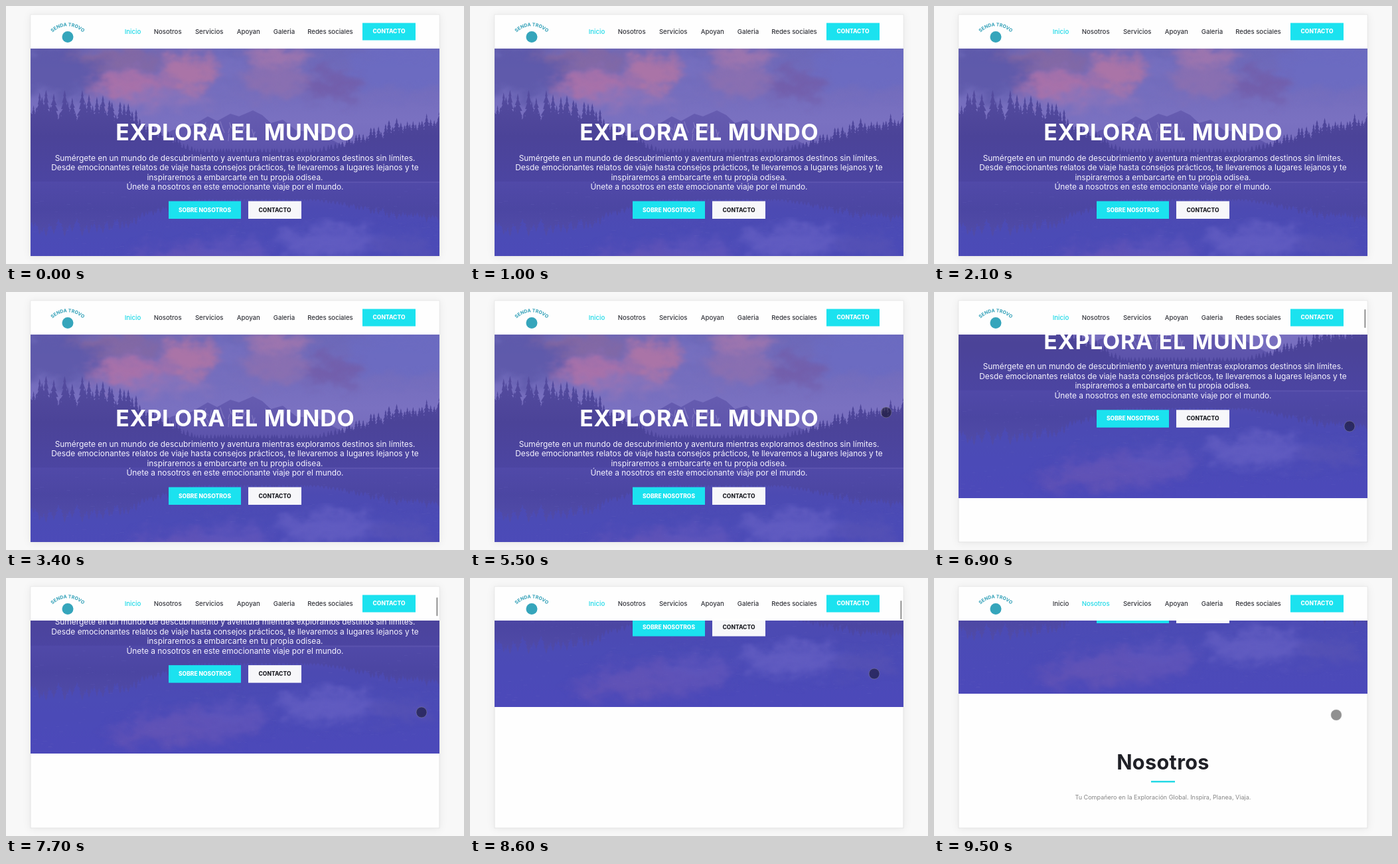
Write an HTML page that moves like this. It is 690 px wide and 388 px high and loops after 9.6 s.

```html
<!DOCTYPE html>
<html lang="es">
<head>
<meta charset="utf-8">
<style>
  html, body { margin: 0; width: 100%; height: 100%; overflow: hidden; background: #f8f8f8; }
  svg { display: block; width: 690px; height: 388px; font-family: Inter, sans-serif; text-anchor: middle; }
  filter { color-interpolation-filters: sRGB; }
  .card { fill: #fefefe; stroke: #dedede; stroke-width: .8; filter: drop-shadow(0 1px 6px rgba(0,0,0,.07)); }
  .title { font-size: 34px; font-weight: 700; letter-spacing: .02em; fill: #fff; }
  .lead { font-size: 11.9px; fill: #f6f4ff; }
  .button { font-size: 8.5px; font-weight: 800; }
  .nav { font-size: 9.6px; font-weight: 500; }
  .heading { font-size: 30.7px; font-weight: 700; letter-spacing: .01em; fill: #202127; }
  .tagline { font-size: 9.05px; fill: #858585; }
  .brand { font-size: 7px; font-weight: 700; fill: #2f9fb7; }
</style>
</head>
<body>
<svg viewBox="0 0 690 388">
  <defs>
    <clipPath id="view"><rect x="37" y="64" width="616" height="312"/></clipPath>
    <clipPath id="photo"><rect x="37" y="64" width="616" height="362"/></clipPath>
    <linearGradient id="sky" x2="0" y2="1">
      <stop offset="0" stop-color="#6c68b8"/>
      <stop offset=".5" stop-color="#7a71c1"/>
      <stop offset="1" stop-color="#6c62b6"/>
    </linearGradient>
    <linearGradient id="forest" x2="0" y2="1">
      <stop offset="0" stop-color="#554c9f"/>
      <stop offset=".5" stop-color="#4b4398"/>
      <stop offset="1" stop-color="#4c45a2"/>
    </linearGradient>
    <linearGradient id="lake" x2="0" y2="1">
      <stop offset="0" stop-color="#5750b2"/>
      <stop offset=".25" stop-color="#4c4ab2"/>
      <stop offset=".5" stop-color="#4b4bb6"/>
      <stop offset="1" stop-color="#4c49ba"/>
    </linearGradient>
    <linearGradient id="rock" x2="0" y2="1">
      <stop offset="0" stop-color="#665cb0"/>
      <stop offset="1" stop-color="#544ca8"/>
    </linearGradient>
    <filter id="ragged" x="-20%" y="-20%" width="140%" height="140%">
      <feGaussianBlur in="SourceGraphic" stdDeviation="9" result="haze"/>
      <feTurbulence type="fractalNoise" baseFrequency=".03 .05" numOctaves="5" seed="8" result="noise"/>
      <feDisplacementMap in="haze" in2="noise" scale="45" xChannelSelector="R" yChannelSelector="G"/>
      <feGaussianBlur stdDeviation=".8"/>
    </filter>
    <filter id="soft"><feGaussianBlur stdDeviation=".6"/></filter>
    <path id="arch" d="M68 42A32.6 32.6 0 0 1 118 42"/>
  </defs>

  <rect width="690" height="388" fill="#f8f8f8"/>
  <rect class="card" x="37" y="13" width="616" height="363"/>

  <g clip-path="url(#view)">
    <g id="page">
      <g clip-path="url(#photo)">
        <rect x="37" y="64" width="616" height="220" fill="url(#sky)"/>
        <g id="clouds" filter="url(#ragged)"></g>
        <g filter="url(#soft)">
          <path fill="url(#rock)" d="M190 225L250 187 280 180 304 166 318 173 338 162 351 166 372 157 386 164 399 176 417 171 437 187 470 190 530 222V270H190Z"/>
          <path id="snow" fill="none" stroke="#9288ca" stroke-width="1.4" opacity=".55"/>
          <path id="trees" fill="url(#forest)"/>
          <rect x="37" y="264" width="616" height="162" fill="url(#lake)"/>
          <use href="#trees" transform="translate(0 422.4) scale(1 -.6)" opacity=".6"/>
          <path d="M230 265H653" stroke="#7a70c0" stroke-width="1.2" opacity=".5"/>
        </g>
        <g id="reflections" filter="url(#ragged)"></g>
        <path id="ripples" fill="none" stroke="#7770c4" stroke-width=".6" opacity=".28"/>
      </g>
      <text class="title" x="345.3" y="202.3">EXPLORA EL MUNDO</text>
      <g class="lead">
        <text x="345" y="232.5">Sumérgete en un mundo de descubrimiento y aventura mientras exploramos destinos sin límites.</text>
        <text x="345" y="247">Desde emocionantes relatos de viaje hasta consejos prácticos, te llevaremos a lugares lejanos y te</text>
        <text x="345" y="261.5">inspiraremos a embarcarte en tu propia odisea.</text>
        <text x="345" y="276">Únete a nosotros en este emocionante viaje por el mundo.</text>
      </g>
      <g class="button">
        <rect x="245" y="293.5" width="109" height="26.5" fill="#1be2ef"/>
        <text x="299.5" y="309.5" fill="#fff">SOBRE NOSOTROS</text>
        <rect x="365" y="293.5" width="80" height="26.5" fill="#f7f7fa"/>
        <text x="405" y="309.5" fill="#202127">CONTACTO</text>
      </g>
      <g id="about">
        <text class="heading" x="345" y="539.5">Nosotros</text>
        <rect x="327" y="557" width="36" height="2.5" fill="#25d9e5"/>
        <text class="tagline" x="345" y="585">Tu Compañero en la Exploración Global. Inspira, Planea, Viaja.</text>
      </g>
    </g>
  </g>

  <rect x="37.4" y="13.4" width="615.2" height="50.6" fill="#fefefe"/>
  <circle cx="93" cy="46.5" r="8.5" fill="#35a5bb"/>
  <text class="brand"><textPath href="#arch" startOffset="50%">SENDA TROVO</textPath></text>
  <g id="nav" class="nav"></g>
  <g class="button">
    <rect x="537" y="25.5" width="80" height="26" fill="#1be2ef"/>
    <text x="577" y="41.3" fill="#fff">CONTACTO</text>
  </g>
  <rect id="thumb" x="648.5" width="1.8" height="28" rx=".9" fill="#858585"/>
  <circle id="pointer" r="8" fill="#000" fill-opacity=".43" stroke="#aaa" stroke-opacity=".35"/>
</svg>
<script>
const LOOP = 9600;
const $ = id => document.getElementById(id);
const clamp = v => Math.max(0, Math.min(1, v));
const progress = (t, start, length) => clamp((t - start) / length);
const easeOut = p => 1 - (1 - p) ** 3;
const easeInOut = p => p * p * (3 - 2 * p);

let seed = 11;
const random = () => (seed = seed * 16807 % 2147483647) / 2147483647;

const blobs = list => list.map(([x, y, rx, ry, color]) =>
  `<ellipse cx="${x}" cy="${y}" rx="${rx}" ry="${ry}" fill="${color}" opacity=".85"/>`).join('');

$('clouds').innerHTML = blobs([
  [75, 95, 75, 42, '#5c57a9'], [600, 95, 90, 36, '#6c6cc2'],
  [170, 76, 70, 15, '#88689f'], [185, 120, 55, 24, '#b273a6'],
  [275, 100, 38, 30, '#b476a4'], [235, 142, 80, 12, '#8a75bb'],
  [410, 74, 46, 15, '#a978ac'], [405, 112, 55, 22, '#8d70b0'],
  [490, 120, 48, 20, '#725ca9'], [335, 95, 22, 24, '#7770c0']
]);
$('reflections').innerHTML = blobs([
  [285, 383, 100, 22, '#6254b8'], [230, 398, 80, 15, '#6253b6'],
  [345, 366, 50, 16, '#5e55bb'], [485, 355, 78, 22, '#645fc2'],
  [595, 362, 48, 13, '#5853b4']
]);

// Height of the wooded shore: it rises towards both edges.
const shore = x => 220 - 44 * clamp((285 - x) / 130) - 34 * clamp((x - 470) / 170);

function fir(x, base, height, width) {
  const tiers = 6, left = [], right = [];
  for (let i = 1; i <= tiers; i++) {
    const y = base - height * (1 - i / tiers);
    const reach = width * i / tiers * (.75 + random() * .5);
    right.push(`${x + reach} ${y}L${x + reach * .5} ${y}`);
    left.unshift(`${x - reach * .5} ${y}L${x - reach} ${y}`);
  }
  return `M${x} ${base - height}L${right.join('L')}L${left.join('L')}Z`;
}

let ground = 'M30 266', firs = '';
for (let x = 30; x < 662; x += 3.5 + random() * 3.5) {
  const y = shore(x);
  const height = 14 + (220 - y) * (.15 + random() * .85);
  ground += `L${x} ${y}`;
  firs += fir(x, y + 8, height, 4 + height * .13);
}
$('trees').setAttribute('d', `${ground}L662 266Z${firs}`);

let snow = '', ripples = '';
for (let i = 0; i < 28; i++) {
  const x = 300 + random() * 120;
  snow += `M${x} ${172 + random() * 20}l${random() * 12 - 6} ${5 + random() * 9}`;
}
for (let i = 0; i < 260; i++)
  ripples += `M${37 + random() * 616} ${272 + random() * 154}h${1 + random() * 6}`;
$('snow').setAttribute('d', snow);
$('ripples').setAttribute('d', ripples);

$('nav').innerHTML = [
  ['Inicio', 191], ['Nosotros', 243.7], ['Servicios', 306.2],
  ['Apoyan', 365.3], ['Galeria', 419], ['Redes sociales', 488.5]
].map(([label, x]) => `<text x="${x}" y="42">${label}</text>`).join('');
const links = [...$('nav').children];

const pointerStops = [
  [5800, 627, 181], [6300, 626, 202], [7700, 626, 202],
  [8200, 609, 144], [8650, 609, 144], [9350, 606, 206]
];
function pointerAt(t) {
  let [, x, y] = pointerStops[0];
  for (let i = 1; i < pointerStops.length; i++) {
    const [start, x0, y0] = pointerStops[i - 1], [end, x1, y1] = pointerStops[i];
    if (t < start) break;
    const p = easeInOut(progress(t, start, end - start));
    x = x0 + (x1 - x0) * p;
    y = y0 + (y1 - y0) * p;
  }
  return [x, y];
}

function draw(now) {
  const t = now % LOOP;
  const scroll = 116.2 * (easeOut(progress(t, 6100, 800)) + easeOut(progress(t, 7600, 650)))
    + 19.6 * easeInOut(progress(t, 8620, 730));
  $('page').setAttribute('transform', `translate(0 ${-scroll})`);
  $('about').setAttribute('opacity', easeOut(progress(t, 8950, 550)));
  links.forEach((link, i) =>
    link.setAttribute('fill', i === (t < 9000 ? 0 : 1) ? '#1bd9e7' : '#33343b'));
  $('thumb').setAttribute('y', 18 + scroll * .069);
  $('thumb').setAttribute('opacity', progress(t, 6100, 150) * (1 - progress(t, 9100, 300)));
  const [x, y] = pointerAt(t);
  $('pointer').setAttribute('transform', `translate(${x} ${y})`);
  $('pointer').setAttribute('opacity', progress(t, 5100, 250));
  requestAnimationFrame(draw);
}
requestAnimationFrame(draw);
</script>
</body>
</html>
```
